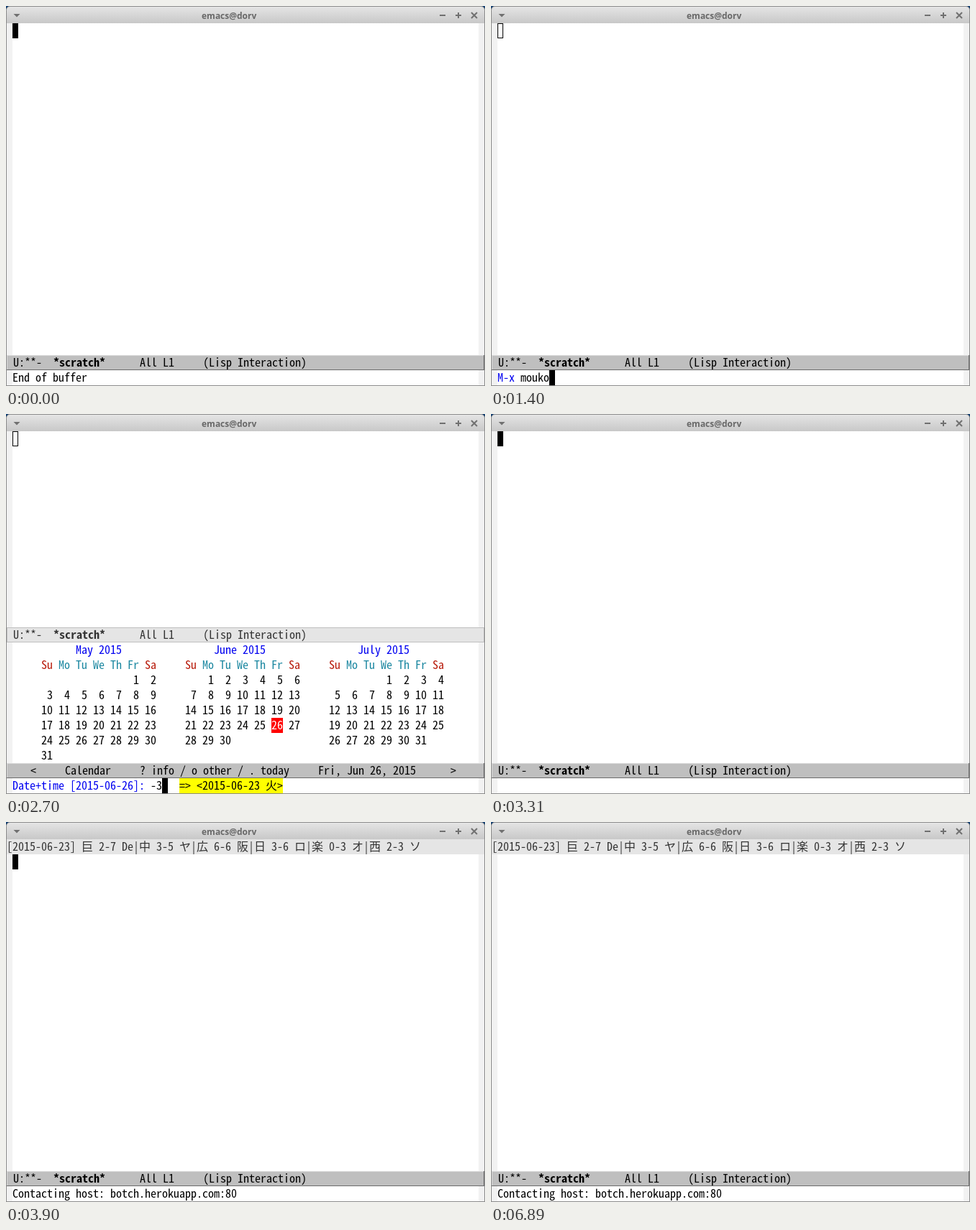
An HTML page with a canvas that plays this animation: 666 px wide and 529 px high, repeating every 6950 ms.

```html
<!DOCTYPE html>
<html lang="ja">
<head>
<meta charset="utf-8">
<title>Editor session</title>
<style>
html, body { margin: 0; width: 100%; height: 100%; overflow: hidden; }
canvas { display: block; }
</style>
</head>
<body>
<canvas id="stage" width="666" height="529"></canvas>
<script>
const ctx = document.getElementById('stage').getContext('2d', { alpha: false });
const LOOP = 6950, CELL = 8, LINE = 21, LEFT = 9;
const TOP = 24, SPLIT = 297, MODE = 486, MINI = 507;
const MONO = '16px "Noto Sans Mono CJK JP", "Noto Sans CJK JP", "Noto Sans Mono", monospace';
const BLUE = '#0000f0';

function rect(x, y, w, h, color) {
  ctx.fillStyle = color;
  ctx.fillRect(x, y, w, h);
}

// Writes on the character grid (CJK takes two cells) and returns the end x.
function write(str, x, y, color = '#000', bold = false) {
  ctx.font = (bold ? 'bold ' : '') + MONO;
  ctx.fillStyle = color;
  for (const ch of str) {
    ctx.fillText(ch, x, y + 16);
    x += ch > '\u2fff' ? 2 * CELL : CELL;
  }
  return x;
}

function cursor(x, y, hollow) {
  if (!hollow) return rect(x, y, CELL, LINE, '#000');
  ctx.strokeStyle = '#000';
  ctx.lineWidth = 1;
  ctx.strokeRect(x + .5, y + .5, CELL - 1, LINE - 1);
}

function path(points, fill, stroke) {
  ctx.beginPath();
  points.forEach(([x, y]) => ctx.lineTo(x, y));
  ctx.closePath();
  ctx.fillStyle = fill;
  ctx.fill();
  if (!stroke) return;
  ctx.strokeStyle = stroke;
  ctx.lineWidth = 1.2;
  ctx.stroke();
}

function drawFrame() {
  rect(0, 0, 666, 529, '#8c8c8c');
  rect(1, TOP, 664, 504, '#fff');

  rect(0, 0, 666, 5, '#123e70');
  const bar = ctx.createLinearGradient(0, 0, 0, TOP);
  bar.addColorStop(0, '#e6e6e6');
  bar.addColorStop(1, '#c8c8c8');
  ctx.beginPath();
  ctx.roundRect(.5, .5, 665, 24, [5, 5, 0, 0]);
  ctx.fillStyle = bar;
  ctx.fill();
  ctx.strokeStyle = '#8c8c8c';
  ctx.lineWidth = 1;
  ctx.stroke();
  rect(1, TOP, 664, 1, '#fff');
  rect(1, TOP, 8, 504, '#f2f2f2');
  rect(657, TOP, 8, 504, '#f2f2f2');

  ctx.font = 'bold 12px "Noto Sans", "Open Sans", sans-serif';
  ctx.fillStyle = '#686868';
  ctx.fillText('emacs@dorv', 272, 18);

  const ink = '#707070';
  path([[10.5, 11], [19.5, 11], [15, 15.5]], ink);
  rect(603, 12, 8, 2, ink);
  rect(625, 12, 8, 2, ink);
  rect(628, 9, 2, 8, ink);
  ctx.strokeStyle = ink;
  ctx.lineWidth = 2;
  ctx.beginPath();
  for (const d of [4, -4]) {
    ctx.moveTo(651 - d, 9);
    ctx.lineTo(651 + d, 17);
  }
  ctx.stroke();
}

function modeLine(y, active) {
  rect(1, y, 664, LINE, active ? '#bfbfbf' : '#e5e5e5');
  const [light, dark] = active ? ['#d9d9d9', '#6c6c6c'] : ['#bfbfbf', '#bfbfbf'];
  rect(1, y, 664, 1, light);
  rect(1, y, 1, LINE, light);
  rect(1, y + LINE - 1, 664, 1, dark);
  rect(664, y, 1, LINE, dark);
}

function scratchLine(y, active) {
  const ink = active ? '#000' : '#333';
  modeLine(y, active);
  write('U:**-', 10, y, ink);
  write('*scratch*', 66, y, ink, true);
  write('All L1     (Lisp Interaction)', 186, y, ink);
}

function month(title, titleCol, col, firstDay, days) {
  const y = SPLIT + LINE, x0 = LEFT + col * CELL;
  write(title, LEFT + titleCol * CELL, y, BLUE);
  ['Su', 'Mo', 'Tu', 'We', 'Th', 'Fr', 'Sa'].forEach((name, i) =>
    write(name, x0 + i * 24, y + LINE, i % 6 === 0 ? '#b81c0c' : '#1b87a0'));
  for (let d = 1; d <= days; d++) {
    const slot = firstDay + d - 1;
    const x = x0 + slot % 7 * 24;
    const row = y + (2 + Math.floor(slot / 7)) * LINE;
    const today = title === 'June 2015' && d === 26;
    if (today) rect(x, row, 16, LINE, '#f00');
    write(String(d).padStart(2), x, row, today ? '#fff' : '#000');
  }
}

function calendar() {
  scratchLine(SPLIT, false);
  month('May 2015', 11, 5, 5, 31);
  month('June 2015', 35, 30, 1, 30);
  month('July 2015', 60, 55, 3, 31);
  modeLine(MODE, true);
  write('<     Calendar     ? info / o other / . today', 34, MODE);
  write('Fri, Jun 26, 2015      >', 434, MODE);
}

function datePrompt(t) {
  const typed = t < 2480 ? '' : t < 2700 ? '-' : '-3';
  const end = write(typed, write('Date+time [2015-06-26]: ', LEFT, MINI, BLUE), MINI);
  if (t < 2180 || t >= 2480) cursor(end, MINI);
  const x = end + (typed ? 3 : 2) * CELL;
  rect(x, MINI, 18 * CELL, LINE, '#ff0');
  write(typed === '-3' ? '=> <2015-06-23 火>' : '=> <2015-06-26 金>', x, MINI);
}

function pointer() {
  path([[435.5, 110], [435.5, 126.5], [439, 123.3], [441.6, 128.8],
        [444.2, 127.6], [441.7, 122.2], [446.6, 121.8]], '#fff', '#111');
}

function commandPrompt(t) {
  const count = [700, 900, 1140, 1310, 1400].filter(at => t >= at).length;
  const x = write('M-x ', LEFT, MINI, BLUE);
  cursor(write('mouko'.slice(0, count), x, MINI), MINI);
}

function draw(t) {
  drawFrame();
  const picking = t >= 1710 && t < 3200;
  if (picking) calendar();
  else scratchLine(MODE, true);

  if (t < 440) write('End of buffer', LEFT, MINI);
  else if (t < 1710) commandPrompt(t);
  else if (picking) datePrompt(t);
  else if (t >= 3330) write('Contacting host: botch.herokuapp.com:80', LEFT, MINI);

  if (picking && t < 2440) pointer();

  if (t < 3900) {
    cursor(LEFT, TOP, t >= 440 && t < 3200);
  } else {
    rect(1, TOP, 664, LINE, '#e5e5e5');
    write('[2015-06-23] 巨 2-7 De|中 3-5 ヤ|広 6-6 阪|日 3-6 ロ|楽 0-3 オ|西 2-3 ソ', 1, TOP, '#333');
    const blinkedOff = t >= 5890 && t < 6390 || t >= 6890;
    if (!blinkedOff) cursor(LEFT, TOP + LINE);
  }
}

const start = performance.now();
function tick() {
  draw((performance.now() - start) % LOOP);
  requestAnimationFrame(tick);
}
tick();
</script>
</body>
</html>
```
